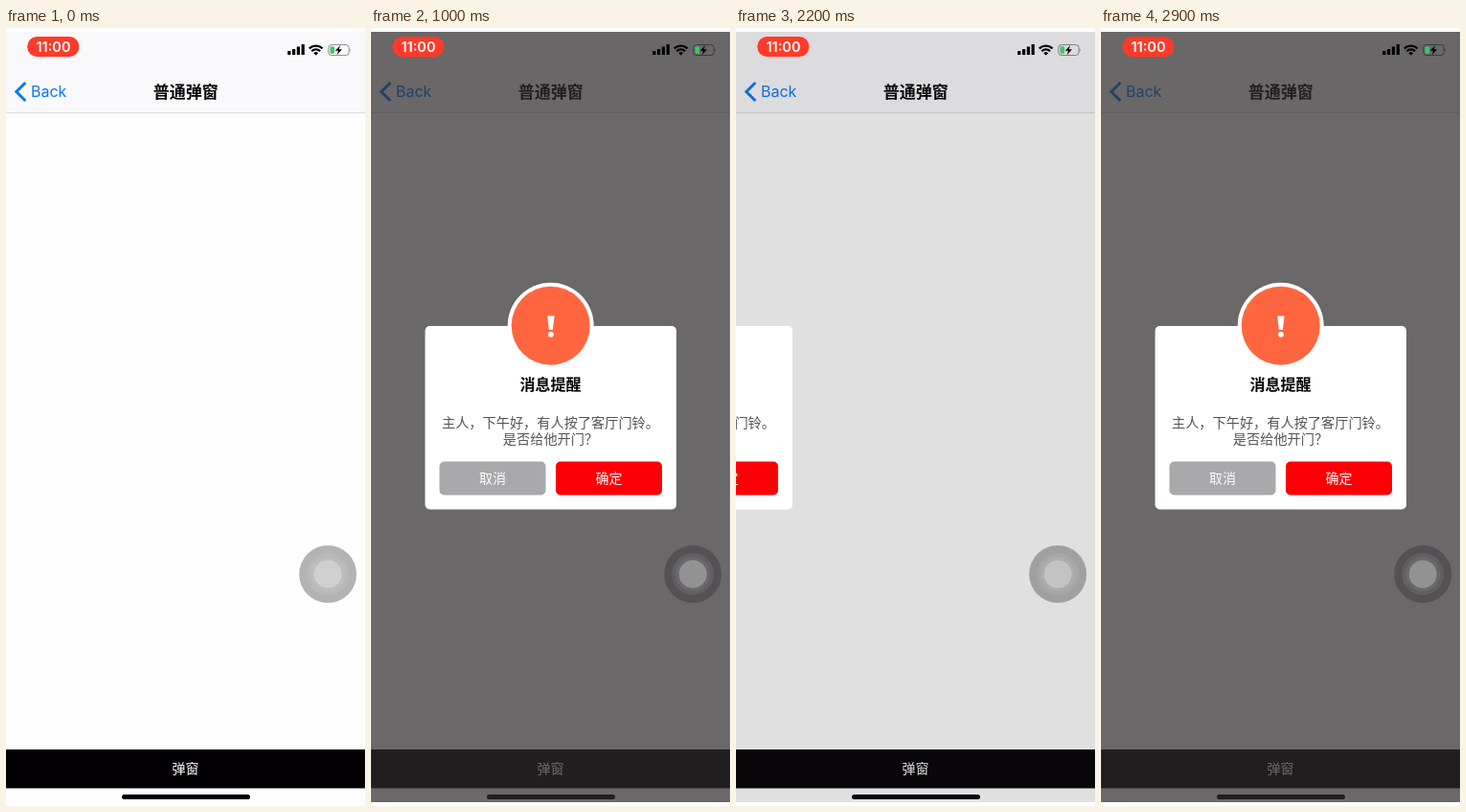
Write an HTML page that moves like this. It is 375 px wide and 812 px high and loops after 3 s.

```html
<!DOCTYPE html>
<html lang="zh-CN">
<head>
<meta charset="utf-8">
<title>普通弹窗</title>
<style>
  html, body { margin: 0; width: 100%; height: 100%; overflow: hidden; background: #fff; }
  svg { display: block; width: 375px; height: 812px; }
  text { font-family: "Noto Sans CJK SC", "Noto Sans CJK", sans-serif; font-size: 14px; text-anchor: middle; }
  .latin { font-family: Inter, Roboto, sans-serif; }
  .bold { font-weight: 600; }
  .light { fill: #fff; }
  .body { font-size: 14.2px; fill: #555356; }

  /* The screen refreshes ten times a second, so every pose is held. */
  .label, .dim, .dialog { animation: 3s step-end infinite; }
  .label { animation-name: press; }
  .dim { animation-name: fade; }
  .dialog { animation-name: slide; }

  @keyframes press {
    0%, 20%, 90% { opacity: 1; }
    16.66%, 86.66% { opacity: .6; }
  }
  @keyframes fade {
    0%, 76.66% { opacity: 0; }
    20%, 90% { opacity: .23; }
    23.33%, 70%, 93.33% { opacity: .57; }
    26.66%, 96.66% { opacity: .705; }
    73.33% { opacity: .14; }
  }
  @keyframes slide {
    0%, 76.66% { transform: translateX(375px); }
    20%, 90% { transform: translateX(210px); }
    23.33%, 93.33% { transform: translateX(24px); }
    26.66%, 96.66% { transform: translateX(0); }
    70% { transform: translateX(-59px); }
    73.33% { transform: translateX(-260px); }
  }
</style>
</head>
<body>
<svg viewBox="0 0 375 812">
  <rect width="375" height="812" fill="#fefefe"/>

  <!-- navigation bar -->
  <rect y="4" width="375" height="84" fill="#f9f8fa"/>
  <rect y="88" width="375" height="1" fill="#dddcde"/>
  <path d="M20.3 57 10.8 66.5 20.3 76" fill="none" stroke="#0a78f6" stroke-width="3"/>
  <text class="latin" x="26" y="72.2" style="font-size:16px;text-anchor:start" fill="#0a78f6">Back</text>
  <text class="bold" x="187.7" y="72.6" style="font-size:17px">普通弹窗</text>

  <!-- bottom button and home indicator -->
  <rect y="753" width="375" height="40.5" fill="#020003"/>
  <text class="label light" x="187.5" y="778.4">弹窗</text>
  <rect x="121" y="800" width="134" height="5" rx="2.5" fill="#020003"/>

  <rect class="dim" y="4" width="375" height="804" fill="#2e2b2d"/>

  <g class="dialog">
    <rect x="56.5" y="311" width="262.5" height="191.5" rx="5" fill="#fff"/>
    <circle cx="187.7" cy="310.7" r="45" fill="#fff"/>
    <circle cx="187.7" cy="310.7" r="41" fill="#ff6640"/>
    <path d="M184.2 300.5h7.4l-1.7 14.5h-4z" fill="#fff"/>
    <circle cx="187.9" cy="319.8" r="2.9" fill="#fff"/>
    <text class="bold" x="187.5" y="377.6" style="font-size:16px">消息提醒</text>
    <text class="body" x="187.5" y="417.3">主人，下午好，有人按了客厅门铃。</text>
    <text class="body" x="187.5" y="433.8">是否给他开门？</text>
    <rect x="71.5" y="452.5" width="111" height="35" rx="5" fill="#a9a8aa"/>
    <rect x="193" y="452.5" width="111" height="35" rx="5" fill="#fd0005"/>
    <text class="light" x="127" y="475.3">取消</text>
    <text class="light" x="248.5" y="475.3">确定</text>
  </g>

  <!-- status bar -->
  <rect x="22.3" y="9" width="54" height="21" rx="10" fill="#fe3b2a"/>
  <text class="latin bold light" x="49.5" y="24.6" style="font-size:14.5px">11:00</text>
  <path d="M294.2 24h3.2v4h-3.2zM299 22h3.2v6H299zM303.8 19.5h3.2v8.5h-3.2zM308.6 17h3.2v11h-3.2z"/>
  <g fill="none" stroke="#000" stroke-width="2.3">
    <path d="M316.8 21.3a10 10 0 0 1 13.8 0"/>
    <path d="M319.3 24.2a6.2 6.2 0 0 1 8.8 0"/>
  </g>
  <path d="M323.7 28.6l-2.4-2.4a3.5 3.5 0 0 1 4.8 0z"/>
  <rect x="336.8" y="17.5" width="21.4" height="11" rx="3.3" fill="none" stroke="#000" stroke-opacity=".42"/>
  <path d="M359.4 21.2q1.5 1.8 0 3.6z" fill-opacity=".45"/>
  <rect x="338.5" y="19.2" width="4.6" height="7.6" rx="1.4" fill="#3cc765"/>
  <path d="M349.2 18l-5.4 5.8h3.3l-1.4 4.5 5.3-6h-3.3z"/>

  <!-- floating touch button -->
  <g transform="translate(336.2 570)" fill="#fff">
    <circle r="30" fill="#2b2a2b" fill-opacity=".35"/>
    <circle r="22" fill-opacity=".08"/>
    <circle r="18" fill-opacity=".06"/>
    <circle r="14.5" fill-opacity=".28"/>
  </g>

  <path d="M0 0h375v4H0zM0 808h375v4H0z" fill="#fff"/>
</svg>
</body>
</html>
```
